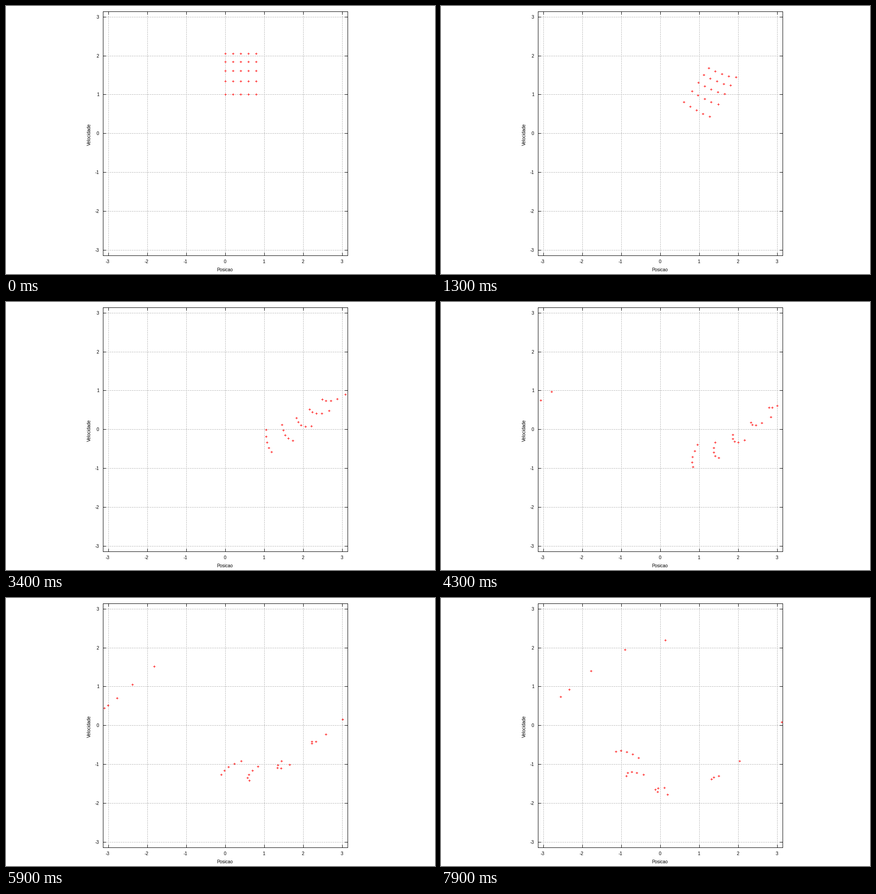
A matplotlib script that plays this animation: 947 by 592 pixels, repeating every 8 s.

```python
import numpy as np
import matplotlib.pyplot as plt
from matplotlib.animation import FuncAnimation

W, H, DPI = 947, 592, 64
PX = 72 / DPI                     # one pixel in points
LEFT, RIGHT, TOP, BOTTOM = 214, 754, 12, 551
X0, Y0 = 484.0, 281.65            # origin in pixels
UX, UY = 86.0, (BOTTOM - TOP) / (2 * np.pi)   # pixels per unit
FRAMES, DT, SUBSTEPS = 80, 0.05, 5

plt.rcParams["path.simplify"] = False
plt.rcParams["font.family"] = "Liberation Sans"

fig = plt.figure(figsize=(W / DPI, H / DPI), dpi=DPI, facecolor="white")
ax = fig.add_axes([0, 0, 1, 1])
ax.set(xlim=(0, W), ylim=(H, 0))
ax.axis("off")


def to_pixels(x, y):
    return np.floor(X0 + UX * x), np.floor(Y0 - UY * y)


def line(xs, ys, color="black", style="-", z=2):
    return ax.plot(xs, ys, color=color, ls=style, lw=PX, zorder=z, snap=False,
                   antialiased=False, solid_capstyle="butt",
                   dash_capstyle="butt")[0]


def hline(x1, x2, y, **kw):
    line([x1, x2 + 1], [y + 0.5] * 2, **kw)


def vline(x, y1, y2, **kw):
    line([x + 0.5] * 2, [y2 + 1, y1], **kw)


def label(x, y, text, ha="center", **kw):
    ax.text(x, y, text, ha=ha, va="baseline", fontsize=10 * PX,
            color="black", **kw)


def draw_axes():
    dots = dict(color="#a0a0a0", style=(0, (1, 2)), z=1)
    for k in range(-3, 4):
        col, row = to_pixels(k, k)
        hline(LEFT, RIGHT, row, **dots)
        vline(col, TOP, BOTTOM, **dots)
        hline(LEFT, LEFT + 6, row)
        hline(RIGHT - 6, RIGHT, row)
        vline(col, TOP, TOP + 6)
        vline(col, BOTTOM - 6, BOTTOM)
        label(col - (2 if k < 0 else 0.5), 568, str(k))
        label(205.5, row + 4, str(k), ha="right")
    for y in (TOP, BOTTOM):
        hline(LEFT, RIGHT, y)
    for x in (LEFT, RIGHT):
        vline(x, TOP, BOTTOM)
    label(482.5, 586, "Posicao")
    label(186.5, 283.5, "Velocidade", rotation=90, rotation_mode="anchor")


def slope(s):
    return np.array([s[1], -np.sin(s[0])])


def rk4(s, h):
    a = slope(s)
    b = slope(s + h / 2 * a)
    c = slope(s + h / 2 * b)
    d = slope(s + h * c)
    return s + h / 6 * (a + 2 * b + 2 * c + d)


def simulate():
    """Pendulum states (angle, velocity) for every frame."""
    angle, energy = np.meshgrid(0.2 * np.arange(5), 0.8 * np.arange(5))
    s = np.array([angle.ravel(), np.sqrt(1 + energy.ravel())])
    states = []
    for _ in range(FRAMES):
        states.append(s)
        for _ in range(SUBSTEPS):
            s = rk4(s, DT / SUBSTEPS)
    return states


def crosses(x, y):
    """Five-pixel plus signs as one broken line."""
    gap = np.full_like(x, np.nan)
    mx, my = x + 0.5, y + 0.5
    xs = np.column_stack([x - 2, x + 3, gap, mx, mx, gap])
    ys = np.column_stack([my, my, gap, y - 2, y + 3, gap])
    return xs.ravel(), ys.ravel()


draw_axes()
states = simulate()
points = line([], [], color="red", z=3)


def update(i):
    angle, speed = states[i]
    angle = (angle + np.pi) % (2 * np.pi) - np.pi
    points.set_data(*crosses(*to_pixels(angle, speed)))
    return [points]


anim = FuncAnimation(fig, update, frames=FRAMES, interval=100, repeat=True,
                     repeat_delay=0)
plt.show()
```
